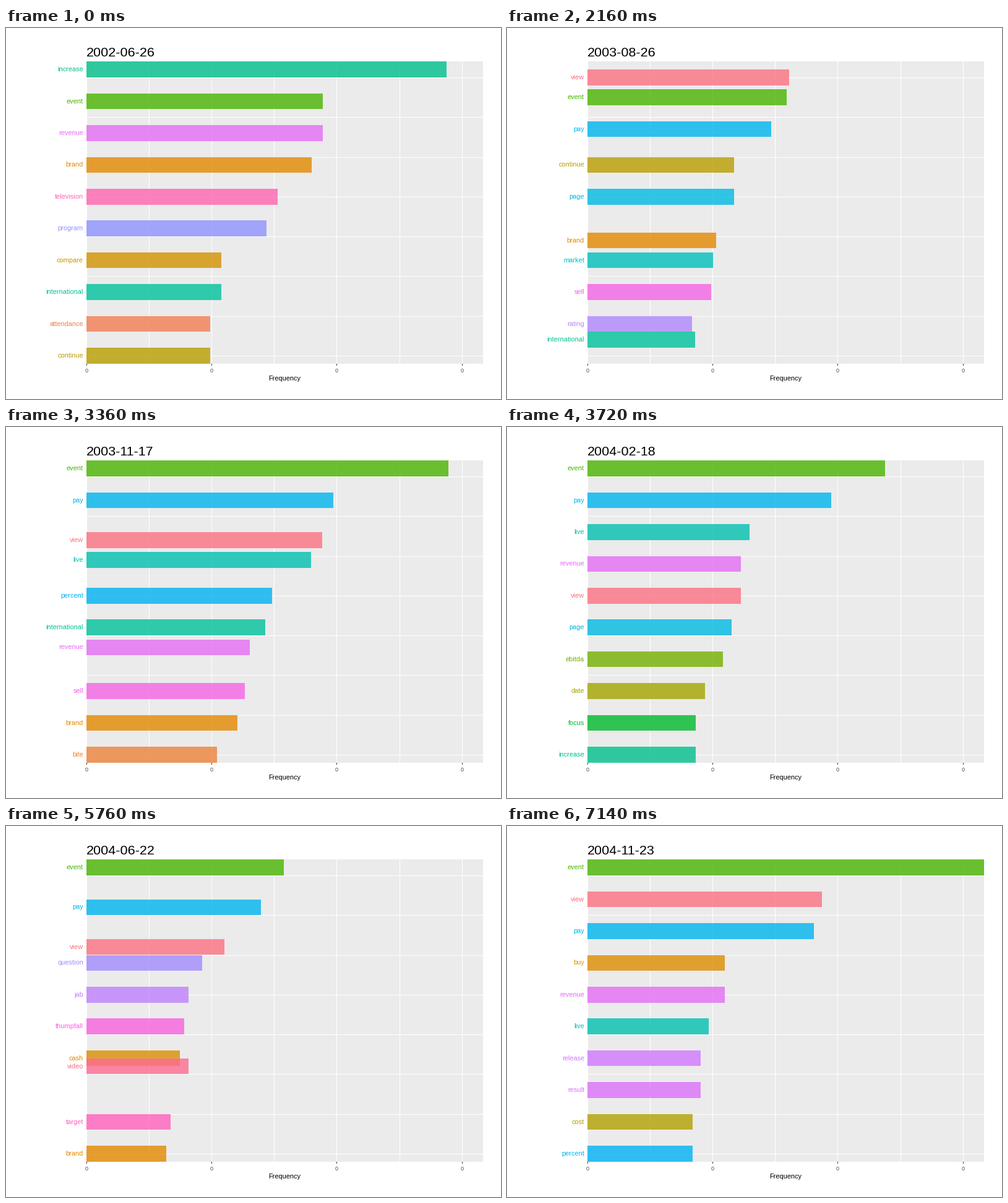
These frames come from a looping animation (800 px wide and 600 px high, 8 s). A matplotlib script:

```python
import numpy as np
import matplotlib.pyplot as plt
from matplotlib.animation import FuncAnimation
from matplotlib.patches import Rectangle

W, H, DPI = 800, 600, 100
LOOP, TICK = 8000, 20
STEP = 60                          # ms between picture changes
PERIOD, FIRST, TWEEN = 20, 16, 4   # in steps
LEFT, RIGHT, TOP, BOTTOM = 130, 771, 54, 543
ROW_TOP, PITCH, BAR = 54.3, 51.43, 25.6

# Hue angle of each word, in drawing order
HUES = {
    "attendance": 24, "bite": 31, "brand": 41, "buy": 47, "cash": 52,
    "compare": 56, "continue": 73, "cost": 78, "current": 82, "date": 87,
    "ebitda": 107, "event": 120, "focus": 132, "home": 151,
    "increase": 165, "international": 173, "live": 183, "market": 190,
    "page": 215, "pay": 223, "percent": 228, "program": 265,
    "question": 271, "rating": 276, "jab": 281, "release": 290,
    "result": 296, "revenue": 301, "sell": 314, "thumpfall": 319,
    "target": 339, "television": 345, "time": 352, "video": 0, "view": 7,
}

# Date, pixels per count, ranked words, counts
STATES = [
    ("2002-06-26", 18.2,
     "increase event revenue brand television program compare "
     "international attendance continue",
     (32, 21, 21, 20, 17, 16, 12, 12, 11, 11)),
    ("2003-08-26", 11.28,
     "view event pay continue page brand market sell rating international",
     (28, 25, 25, 21, 21, 18, 18, 17, 15, 14)),
    ("2003-11-17", 11.11,
     "event pay view live percent international revenue sell brand bite",
     (54, 36, 36, 34, 27, 26, 24, 23, 22, 19)),
    ("2004-02-18", 14.58,
     "event pay live revenue view page ebitda date focus increase",
     (33, 27, 18, 17, 17, 16, 15, 13, 12, 12)),
    ("2004-06-22", 7.18,
     "event pay view question jab thumpfall cash video target brand",
     (45, 41, 32, 26, 23, 22, 21, 21, 19, 18)),
    ("2004-08-23", 13.25,
     "event video international pay time home view current page television",
     (22, 20, 16, 15, 14, 13, 13, 12, 12, 12)),
    ("2004-11-23", 13.08,
     "event view pay buy revenue live release result cost percent",
     (49, 29, 28, 17, 17, 15, 14, 14, 13, 13)),
]
TITLES = [s[0] for s in STATES]
RANKS = [{w: np.array([row, n * unit])
          for row, (w, n) in enumerate(zip(words.split(), counts))}
         for _, unit, words, counts in STATES]


def hcl(hue, chroma=100, lum=65):
    """Polar LUV colour as clipped sRGB."""
    a = np.radians(hue)
    y = ((lum + 16) / 116) ** 3
    u = chroma * np.cos(a) / (13 * lum) + 0.19784
    v = chroma * np.sin(a) / (13 * lum) + 0.46834
    x = 9 * y * u / (4 * v)
    z = 3 * y / v - x / 3 - 5 * y
    m = np.array([[3.2405, -1.5371, -0.4985],
                  [-0.9693, 1.8760, 0.0416],
                  [0.0556, -0.2040, 1.0572]])
    rgb = np.clip(m @ [x, y, z], 0, 1)
    return np.where(rgb > 0.00304, 1.055 * rgb ** (1 / 2.4) - 0.055,
                    12.92 * rgb)


def ease(p):
    return 2 * p * p if p < 0.5 else 1 - 2 * (1 - p) ** 2


plt.rcParams["font.family"] = "Liberation Sans"
fig = plt.figure(figsize=(W / DPI, H / DPI), dpi=DPI, facecolor="white")
ax = fig.add_axes([0, 0, 1, 1])
ax.set_xlim(0, W)
ax.set_ylim(H, 0)
ax.axis("off")


def box(x, y, w, h, color, **kw):
    return ax.add_patch(Rectangle((x, y), w, h, fc=color, lw=0,
                                  antialiased=False, **kw))


def label(x, y, text, px, color="black", ha="left"):
    return ax.text(x, y, text, fontsize=px * 72 / DPI, color=color, ha=ha,
                   va="baseline")


box(LEFT, TOP, RIGHT - LEFT, BOTTOM - TOP, "#EBEBEB")
for k in range(8):
    y = ROW_TOP + BAR / 2 + PITCH * (9 - 1.25 * k)
    box(LEFT, round(y), RIGHT - LEFT, 1, "white")
for k in range(7):
    x = int(LEFT + 101.2 * k)
    box(x, TOP, 1, BOTTOM - TOP, "white")
    if k % 2 == 0:
        box(x, BOTTOM, 1, 3, "#333333")
        label(x, 557, "0", 9, "#4D4D4D", "center")
label(450, 570, "Frequency", 11, ha="center")
title = label(LEFT, 46, "", 21.5)

bars, tags = {}, {}
for word, hue in HUES.items():
    color = hcl(hue)
    bars[word] = box(LEFT, 0, 0, 0, color, alpha=0.8, zorder=2)
    tags[word] = label(125, 0, word, 11, color, "right")


def pose(t):
    """Title and {word: (row, length)} at time t in ms."""
    s = t // STEP - FIRST
    if s < 0:
        return TITLES[0], RANKS[0]
    n, k = s // PERIOD, s % PERIOD + 1
    if k >= TWEEN:
        return TITLES[n + 1], RANKS[n + 1]
    old, new = RANKS[n], RANKS[n + 1]
    f = ease(k / TWEEN)
    # Leaving words stay put, arriving ones wait for the end
    mix = {w: a + f * (new.get(w, a) - a) for w, a in old.items()}
    return TITLES[n + (2 * k > TWEEN)], mix


def update(i):
    date, shown = pose(i * TICK)
    title.set_text(date)
    for word, bar in bars.items():
        on = word in shown
        bar.set_visible(on)
        tags[word].set_visible(on)
        if on:
            row, length = shown[word]
            y = ROW_TOP + PITCH * row
            top, end = round(y), round(y + BAR)
            bar.set_bounds(LEFT, top, round(length), end - top)
            tags[word].set_y(y + BAR / 2 + 3)
    return [title, *bars.values(), *tags.values()]


anim = FuncAnimation(fig, update, frames=LOOP // TICK, interval=TICK,
                     repeat=True, repeat_delay=0, blit=False)
plt.show()
```
